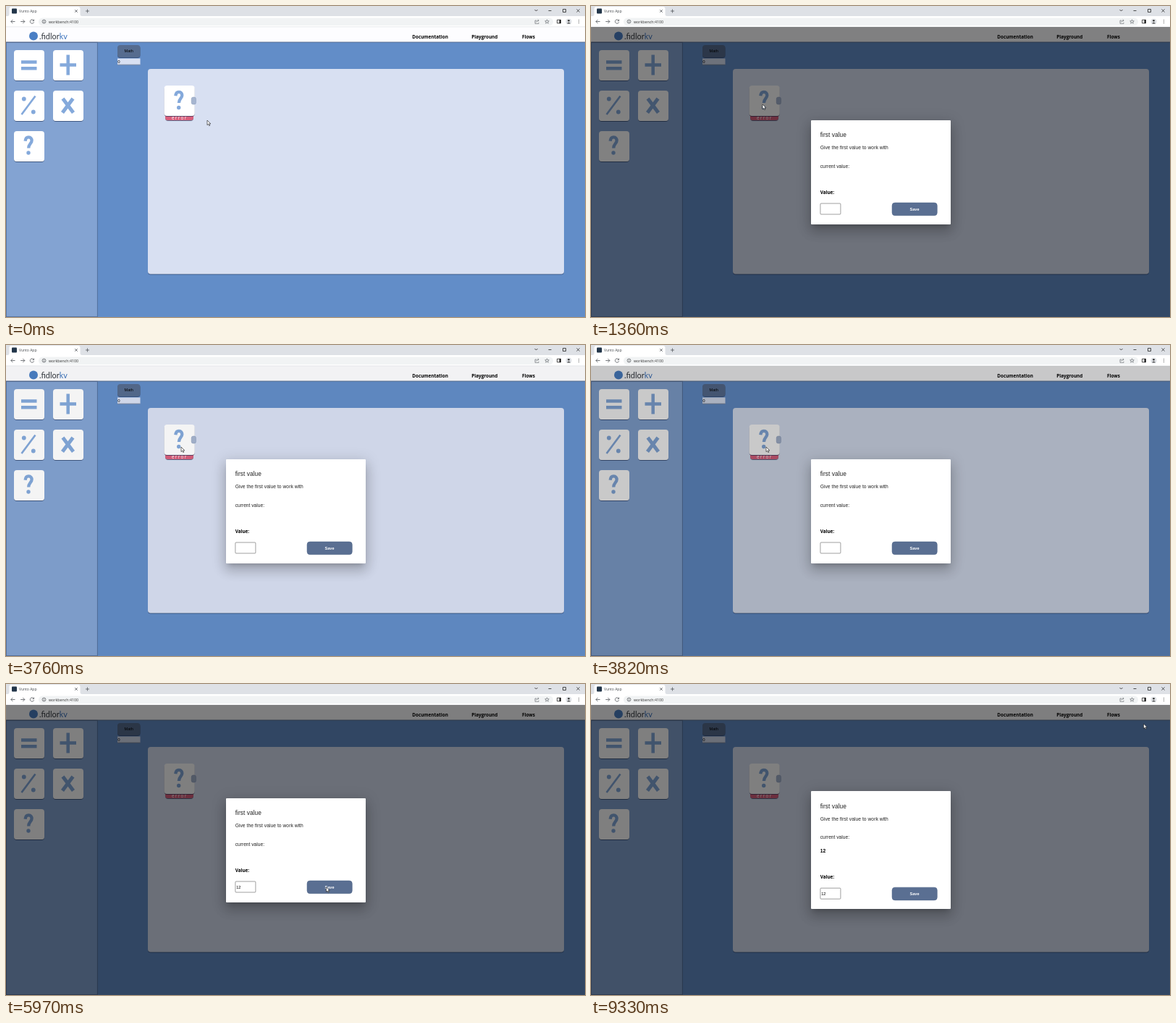
An HTML page for the animation above (9360 ms loop, 800 px wide and 430 px high).

```html
<!DOCTYPE html>
<html lang="en">
<head>
<meta charset="utf-8">
<title>Value dialog</title>
<style>
  html, body { margin: 0; width: 100%; height: 100%; overflow: hidden; background: #628dc8; }
  svg, div { position: absolute; left: 0; top: 0; }
  svg { width: 800px; height: 430px; }
  text { font-family: "Liberation Sans", Arial, sans-serif; font-size: 6.67px; white-space: pre; }
  .ui { font-family: "Open Sans", "Noto Sans", sans-serif; }
  .nav { font-size: 6.35px; font-weight: 700; }
  .icon { fill: none; stroke: #55595e; stroke-width: .8; }
  .glyph { fill: none; stroke: #84a9db; }
  #shade { top: 29px; width: 800px; height: 401px; background: #000; }
  #dialog {
    left: 303.5px; width: 193px; background: #fff; border-radius: 1px;
    box-shadow: 0 4.6px 6.2px -2.9px #0003, 0 10px 15.8px 1.3px #00000024, 0 3.8px 19.2px 3.3px #0000001f;
  }
</style>
</head>
<body>
<svg viewBox="0 0 800 430">
  <defs>
    <filter id="drop" x="-20%" y="-20%" width="140%" height="150%">
      <feDropShadow dx="0" dy="1" stdDeviation=".7" flood-color="#1c3358" flood-opacity=".65"/>
    </filter>
    <rect id="tile" width="42" height="42" rx="4" fill="#fff" filter="url(#drop)"/>
    <g id="question" class="glyph">
      <path d="M-4.4-6.2C-4-10.4-2.2-11.6.2-11.6 3.3-11.6 4.6-9.4 4.6-7 4.6-2.8.2-2.8.2 3.6" stroke-width="4.3"/>
      <circle cy="10" r="2.7" fill="#84a9db" stroke="none"/>
    </g>
  </defs>

  <!-- browser frame -->
  <rect width="800" height="14" fill="#dee1e6"/>
  <path d="M2 14Q4.500 14 4.500 11V4Q4.500 1 7.500 1H99.500Q102.500 1 102.500 4V11Q102.500 14 105 14Z" fill="#fff"/>
  <rect x="8" y="3.500" width="7" height="7" rx="1" fill="#23364a"/>
  <text class="ui" x="18" y="9.300" font-size="5" style="font-size:5px" fill="#45494d">Vunto App</text>
  <rect y="14" width="800" height="15" fill="#fff"/>
  <rect x="45" y="16.500" width="711" height="10.500" rx="5.200" fill="#f1f3f4"/>
  <text class="ui" x="59" y="23.600" style="font-size:5.3px" fill="#333">workbench:4100</text>
  <g class="icon">
    <path d="M95.200 5.200l3.600 3.600m0-3.600l-3.600 3.600M110 7h5m-2.500-2.500v5"/>
    <path d="M730.500 5l2 2 2-2M749.500 6.500h4M769.500 4.500h4v4h-4zM788.500 4.500l4 4m0-4l-4 4" stroke="#222"/>
    <path d="M12.500 21.500H6.800m2.600-2.600l-2.600 2.600 2.600 2.600M20.200 21.500h5.700m-2.600-2.600l2.600 2.600-2.600 2.600"/>
    <path d="M38.300 20a2.700 2.700 0 1 0 .3 2.300M38.600 18.600v2h-2"/>
    <circle cx="52.500" cy="21.500" r="2.400"/>
    <path d="M52.500 21.200v1.600M52.500 20v.6"/>
    <path d="M733 20h-2v4.300h5v-1.500M732.500 22.500q.5-2.500 3.500-2.500m-1.300-1.400l1.500 1.400-1.500 1.400" stroke-width=".6"/>
    <path d="M747.500 18.800l.8 1.900 2 .1-1.600 1.300.6 2-1.800-1.100-1.800 1.100.6-2-1.600-1.300 2-.1z" stroke-width=".6"/>
    <path d="M761.500 19.200h5v4.600h-5z" stroke="#222"/>
    <path d="M764.500 19h2v5h-2z" fill="#222" stroke="none"/>
  </g>
  <circle cx="777.500" cy="21.500" r="4" fill="#dfe2e6"/>
  <path d="M775 24.300q2.500-3.300 5 0z" fill="#333"/>
  <circle cx="777.500" cy="20.300" r="1.300" fill="#333"/>
  <path d="M791.500 19.200v5" stroke="#444" stroke-width="1.100" stroke-dasharray=".9 1.100"/>

  <!-- page header -->
  <rect y="28.500" width="800" height="22" fill="#fdfdff"/>
  <path d="M0 28.800h800" stroke="#d9dbe0" stroke-width=".6"/>
  <circle cx="38" cy="41.500" r="6" fill="#4a7fc4"/>
  <text x="46" y="46" style="font:10.9px Lato,sans-serif" fill="#30353c">.fidlor<tspan fill="#3d74bd">kv</tspan></text>
  <text class="ui nav" x="561.300" y="44.700">Documentation</text>
  <text class="ui nav" x="643.300" y="44.700">Playground</text>
  <text class="ui nav" x="713" y="44.700">Flows</text>

  <!-- sidebar -->
  <rect y="50" width="800" height="380" fill="#628dc8"/>
  <rect x=".3" y="50.300" width="126" height="379.400" fill="#83a3d2" stroke="#4b6690" stroke-width=".8"/>
  <path d="M0 50h800" stroke="#53688a" stroke-width=".9"/>
  <use href="#tile" x="11" y="61"/><use href="#tile" x="65" y="61"/>
  <use href="#tile" x="11" y="117"/><use href="#tile" x="65" y="117"/>
  <use href="#tile" x="11" y="173"/>
  <g class="glyph" stroke-width="4.500">
    <path d="M21 77.500h21.500M21 86.200h21.500M74.500 81.500h22.500M85.700 67.500v28"/>
    <path d="M21.500 150L40.500 124.500" stroke-width="2.700"/>
    <path d="M78.500 128L93 147.500M92.500 128L78 147.500" stroke-width="5"/>
  </g>
  <circle cx="24.800" cy="128.500" r="2.900" fill="#84a9db"/>
  <circle cx="37.800" cy="146.500" r="2.900" fill="#84a9db"/>
  <use href="#question" x="31" y="193"/>

  <!-- workspace -->
  <rect x="154" y="54" width="31.500" height="17" rx="4" fill="#566c8f" filter="url(#drop)"/>
  <text x="169.700" y="64.300" style="font-size:5.55px" text-anchor="middle">Math</text>
  <rect x="154" y="72.500" width="31.500" height="9" fill="#d8e0f2"/>
  <path d="M154 81.200h31.500" stroke="#45546d" stroke-width=".6"/>
  <text x="154.300" y="79.400" style="font-size:6px">0</text>
  <rect x="196" y="87" width="575" height="283.500" rx="4" fill="#d8e0f2" filter="url(#drop)"/>
  <path d="M220 150h39v4q0 4-4 4h-31q-4 0-4-4z" fill="#d95f7b" filter="url(#drop)"/>
  <text class="ui" x="229" y="157" style="font-size:6.2px;letter-spacing:1.4px" fill="#fff">error</text>
  <use href="#tile" x="218.700" y="110"/>
  <use href="#question" x="238.700" y="130.500"/>
  <rect x="256.200" y="126" width="6.300" height="10" rx="2.500" fill="#a6b5d0" stroke="#8799b8" stroke-width=".5"/>
</svg>

<div id="shade"></div>
<div id="dialog"></div>

<svg viewBox="0 0 800 430">
  <g id="content">
    <g id="upper">
      <text x="316.700" y="180.800" style="font-size:8.33px;letter-spacing:.06px" fill="#222">first value</text>
      <text x="316.700" y="198.200" style="letter-spacing:.06px" fill="#222">Give the first value to work with</text>
      <text x="316.700" y="223.700" fill="#222">current value:</text>
      <text id="current" x="316.700" y="242.300" font-weight="700">12</text>
    </g>
    <g id="lower">
      <text class="ui nav" x="316.700" y="260">Value:</text>
      <rect x="316.900" y="273" width="28" height="15" rx="1" fill="#fff" stroke="#767676" stroke-width=".7"/>
      <text id="typed" x="318.200" y="282.500" style="font-size:5.55px"></text>
      <rect x="416" y="272" width="62.300" height="17.700" rx="4" fill="#5a6f92" stroke="#4b6084" stroke-width=".5"/>
      <text x="447" y="282.700" style="font-size:5.55px" font-weight="700" text-anchor="middle" fill="#fff">Save</text>
    </g>
  </g>
  <path id="cursor" d="M0 0V6.600L1.600 5.200 2.700 7.600 3.800 7.100 2.700 4.800H4.800Z" fill="#fff" stroke="#111" stroke-width=".6"/>
</svg>

<script>
const LOOP = 9360;
const TYPE_ONE = 4970, TYPE_TWO = 5120, SAVE = 6300;
const GROW = 9.2;

// Dialog openings: [opens, closes]
const openings = [[1150, 2090], [2400, 3060], [3720, Infinity]];

// Pointer path: [time, x, y]
const path = [
  [0, 278, 158], [490, 238, 138], [700, 238, 138], [760, 237, 137],
  [1030, 237, 137], [1200, 237, 136], [1780, 237, 136], [1820, 238, 137],
  [2600, 238, 137], [2730, 271, 193], [2850, 271, 193], [2910, 273, 194],
  [3200, 273, 194], [3640, 242, 141], [4000, 242, 141], [4390, 320, 268],
  [4730, 326, 277], [5300, 326, 277], [6060, 447, 281], [6390, 447, 281],
  [7180, 318, 223], [7400, 325, 230], [7620, 325, 230], [8060, 390, 288],
  [8120, 390, 288], [9000, 755, 44], [9060, 755, 44], [9330, 763.5, 55], [LOOP, 763.5, 55]
];

const el = id => document.getElementById(id);
const ease = p => { p = Math.min(1, Math.max(0, p)); return p * p * (3 - 2 * p); };

function pointerAt(t) {
  const i = path.findIndex(point => point[0] > t);
  const [t0, x0, y0] = path[i - 1], [t1, x1, y1] = path[i];
  const p = ease((t - t0) / (t1 - t0));
  return [x0 + (x1 - x0) * p, y0 + (y1 - y0) * p];
}

function draw(t) {
  const [opens, closes] = openings.filter(o => o[0] <= t).pop() || [Infinity, Infinity];
  const leaving = t < opens ? 0 : 1 - ease((t - closes) / 195);
  el('shade').style.opacity = 0.5 * ease((t - opens) / 225) * leaving;
  el('dialog').style.opacity = el('content').style.opacity = leaving;

  const saved = t >= SAVE;
  const shift = saved ? GROW : 0;
  el('dialog').style.top = 157.6 - shift + 'px';
  el('dialog').style.height = 144.4 + 2 * shift + 'px';
  el('upper').setAttribute('transform', `translate(0 ${-shift})`);
  el('lower').setAttribute('transform', `translate(0 ${shift})`);
  el('current').style.display = saved ? '' : 'none';
  el('typed').textContent = t < TYPE_ONE ? '' : t < TYPE_TWO ? '1' : '12';
  el('cursor').setAttribute('transform', `translate(${pointerAt(t)})`);
}

function frame() {
  draw(performance.now() % LOOP);
  requestAnimationFrame(frame);
}
frame();
</script>
</body>
</html>
```
